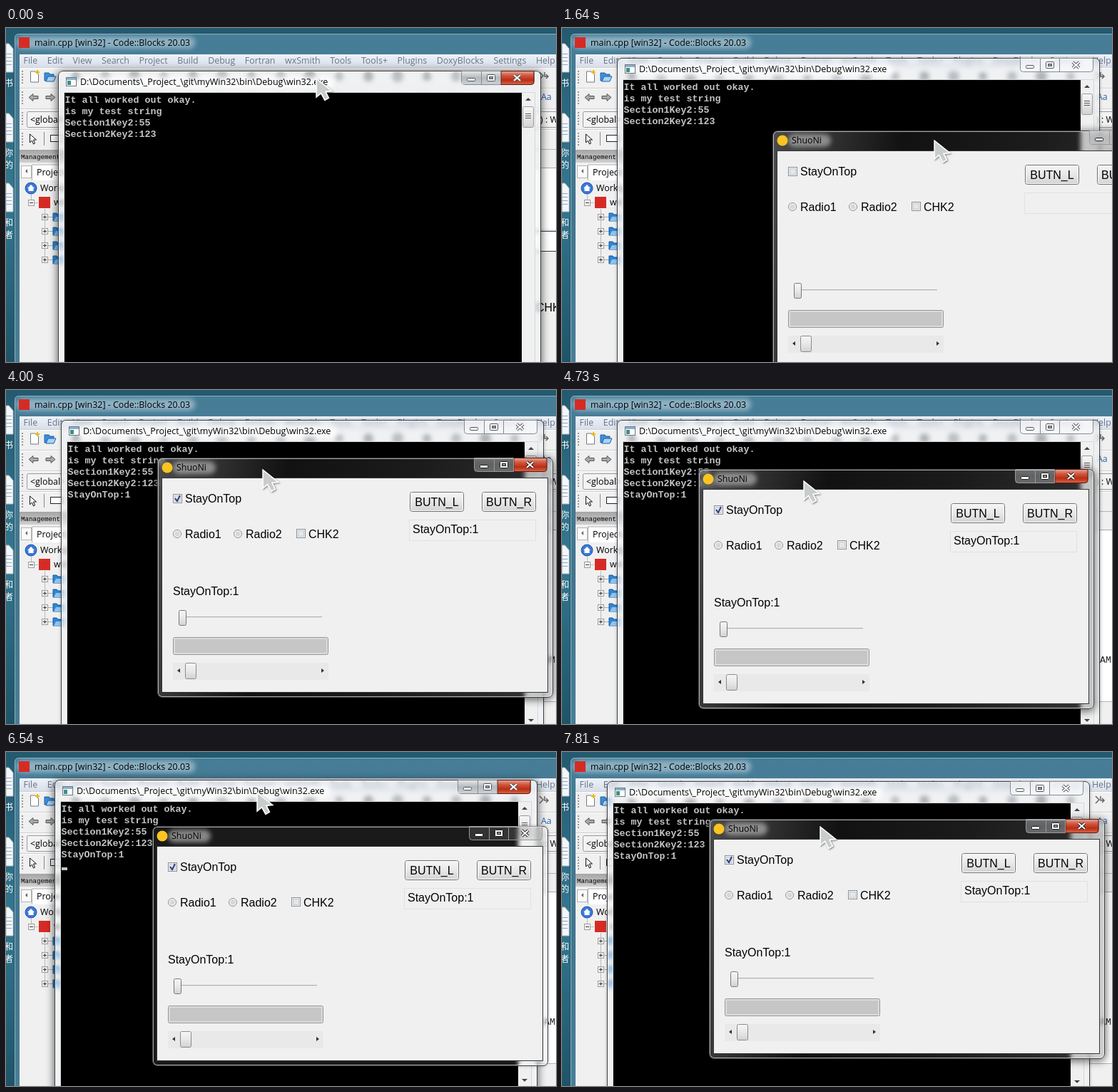
An HTML page that plays this animation: 771x469 px, repeating every 7990 ms.

```html
<!DOCTYPE html>
<html lang="en">
<head>
<meta charset="utf-8">
<title>Stay on top</title>
<style>
html, body { margin: 0; width: 100%; height: 100%; overflow: hidden; }
#stage { position: absolute; inset: 0; overflow: clip; background: #2d6a80; }
svg { position: absolute; left: 0; top: 0; overflow: hidden; }
text { white-space: pre; }
.ui { font: 12.4px "Open Sans", sans-serif; }
.ctl { font: 16px "Liberation Sans", Arial, sans-serif; }
.con { font: bold 13.33px "Liberation Mono", monospace; fill: #c4c4c4; }
.cjk { font: 12px "Noto Sans CJK SC", "Noto Sans CJK", sans-serif; fill: #fff; }
.cap { font: 9.2px "Liberation Mono", monospace; }
.win { position: absolute; left: 0; top: 0; border-radius: 7px; box-sizing: border-box;
  border: 1px solid #3c4043; backdrop-filter: blur(3px);
  box-shadow: inset 0 0 0 1px rgba(255,255,255,.6), 0 0 4px rgba(0,0,0,.3); }
.win.on { box-shadow: inset 0 0 0 1px rgba(255,255,255,.6), 0 2px 12px 1px rgba(0,0,0,.6); }
.win > svg { left: -1px; top: -1px; }
#con { width: 677px; height: 439px; margin-left: -1px; background: rgba(240,242,244,.45); }
#con > svg { left: 0; }
#dlg { width: 555px; height: 337px; z-index: 1; background: rgba(255,255,255,.1); }
#dlg.on { background: linear-gradient(100deg, rgba(150,150,150,.5), rgba(80,80,80,.22) 30%, rgba(90,90,90,.3) 60%, rgba(130,130,130,.4)); }
#cur { z-index: 3; }
.glow { filter: blur(3px); }
.hot { visibility: hidden; }
.on .hot { visibility: visible; }
</style>
</head>
<body>
<div id="stage">
  <svg id="ide" width="771" height="469"></svg>
  <div id="con" class="win"></div>
  <div id="dlg" class="win"></div>
  <svg id="cur" width="32" height="38"></svg>
</div>
<script>
const $ = id => document.getElementById(id);
const R = (x, y, w, h, fill, more = '') => `<rect x="${x}" y="${y}" width="${w}" height="${h}" fill="${fill}" ${more}/>`;
const B = (x, y, w, h, fill, line, r = 0) => R(x + .5, y + .5, w - 1, h - 1, fill, `stroke="${line}" rx="${r}"`);
const T = (x, y, s, cls, more = '') => `<text x="${x}" y="${y}" class="${cls}" ${more}>${s.replace('<g', '&lt;g')}</text>`;
const P = (d, fill, line = 'none', w = 1) => `<path d="${d}" fill="${fill}" stroke="${line}" stroke-width="${w}"/>`;
const C = (x, y, r, fill, line = 'none') => `<circle cx="${x}" cy="${y}" r="${r}" fill="${fill}" stroke="${line}"/>`;
const grad = (id, ...stops) => `<linearGradient id="${id}" x2="0" y2="1">` +
  stops.map((c, i) => `<stop offset="${i / (stops.length - 1)}" stop-color="${c}"/>`).join('') + '</linearGradient>';
const rep = (n, f) => Array.from({ length: n }, (_, i) => f(i)).join('');

function desktop() {
  const doc = y => P(`M0 ${y}h4l6 7v33H0z`, '#f4f6f8', '#a9b9c4') + rep(4, i => R(0, y + 14 + 5 * i, 8, 1, '#8aa8c8'));
  const label = (s, y) => [...s].map((c, i) => T(-2, y + 17 * i, c, 'cjk')).join('');
  return R(0, 0, 771, 469, 'url(#desk)') + rep(3, i => doc(22 + 98 * i)) +
    label('书', 82) + label('你的', 180) + label('和者', 278);
}

function toolbars() {
  let s = rep(4, i => R(19, 55 + 29 * i, 760, 1, '#cfcfcf') + R(19, 56 + 29 * i, 760, 1, '#fff') +
    rep(5, j => R(22, 60 + 29 * i + 4 * j, 2, 2, '#9a9a9a')));
  s += P('M34.500 61h7l4 4v11h-11z', '#fff', '#6c7a8a') + P('M44 59v6M41 62h6', 'none', '#e8b800', 2);
  s += P('M54 63h6l2 2h5v9H54z', '#3d8fd8', '#1f5fa5') + P('M56 75l3-7h11l-3 7z', '#a8d4f5', '#1f5fa5');
  s += P('M32 97.500l6-5v3h7v4h-7v3z', '#a9a9a9', '#555') + P('M69 97.500l-6-5v3h-7v4h7v3z', '#a9a9a9', '#555');
  s += rep(16, i => C(98 + i * 41, 68, 6 + i % 3, i % 2 ? '#8d949b' : '#777d84') + R(90 + i * 41, 92, 10, 10, '#c3c8cd'));
  s += P('M748 62l5 5-5 5M755 62v6h5M757 65l3 3-3 3', 'none', '#666', 1.5) + T(750, 101, 'Aa', 'ui', 'fill="#2a5fae"');
  s += B(29, 117, 330, 23, '#f3f3f3', '#9a9a9a', 2) + T(34, 133, '<global>', 'ui');
  s += B(364, 117, 420, 23, '#f3f3f3', '#9a9a9a', 2) + T(749, 133, ') : WPARAM', 'ui');
  return s + P('M33.500 149v12l3-3 2 5 2-1-2-5h4z', '#fff', '#111') + R(53, 146, 1, 19, '#888') + B(62, 150, 18, 10, '#fff', '#222');
}

function projectTree() {
  const node = (x, y, plus) => B(x - 4, y - 4, 9, 9, '#fff', '#999') + R(x - 2, y, 5, 1, '#333') + (plus ? R(x, y - 2, 1, 5, '#333') : '');
  const folder = y => P(`M59 ${y}.5h7`, 'none', '#aaa') + node(54, y, true) +
    P(`M66 ${y - 5}h5l2 2h8v9H66z`, '#2f86d6', '#155a9c') + P(`M67 ${y + 6}l3-6h12l-2 6z`, '#8fc4ef');
  let s = R(19, 171, 250, 18, 'url(#cap)') + T(21, 184, 'Management', 'cap');
  s += B(21, 193, 15, 18, '#fafafa', '#b5b5b5') + P('M30 198v6l-3-3z', '#666');
  s += P('M36.500 214v-22h70v22', '#fff', '#b0b0b0') + T(43, 207, 'Projects', 'ui');
  s += C(35, 225, 8, '#3a78d8', '#2256a8') + P('M30 225l5-5 5 5h-1.500v4h-7v-4z', '#fff') + T(48, 229, 'Workspace', 'ui');
  s += P('M35.500 234v7M40 245.500h5M54.500 254v72', 'none', '#bbb');
  return s + R(46, 237, 16, 16, '#d62b25') + T(67, 249, 'win32', 'ui', 'font-weight="bold"') +
    node(35, 245) + rep(4, i => folder(265 + 20 * i));
}

function ide() {
  const menu = 'File Edit View Search Project Build Debug Fortran wxSmith Tools Tools+ Plugins DoxyBlocks Settings Help';
  let s = `<defs>${grad('desk', '#245a70', '#347890', '#1f5468')}${grad('bar', '#477d97', '#42768f', '#4a7f98')}
    ${grad('menu', '#eef2f8', '#d8dfea')}${grad('cap', '#a5a5a5', '#cfcfcf')}${grad('face', '#f6f6f6', '#e8e8e8', '#d2d2d2')}
    ${grad('grey', '#e4e6e8', '#b4b9be', '#cdd1d4')}${grad('red', '#e5a596', '#d0563f', '#bb2d14', '#d8674c')}</defs>`;
  s += desktop() + B(11, 7, 800, 500, 'url(#bar)', '#24505f', 6) + B(12, 8, 798, 498, 'none', '#8ab6c9', 5);
  s += R(15, 12, 250, 17, '#c6dbe6', 'rx="8" opacity=".55" class="glow"');
  s += R(18, 13, 15, 15, '#d62b25') + T(40, 25, 'main.cpp [win32] - Code::Blocks 20.03', 'ui');
  s += R(19, 37, 760, 440, '#f0f0f0') + R(19, 37, 760, 18, 'url(#menu)');
  s += T(11, 50, menu.split(' ').map(n => `<tspan dx="13.600">${n}</tspan>`).join(''), 'ui', 'fill="#67758a"');
  s += toolbars() + projectTree();
  // editor pane
  s += R(270, 170, 510, 1, '#b5b5b5') + R(270, 196, 510, 1, '#a8a8a8') + R(270, 197, 510, 240, '#fff');
  return s + R(270, 437, 510, 1, '#b5b5b5') + T(754, 383, 'AM', 'con', 'style="font-weight:400;fill:#222"');
}

// minimise, maximise and close buttons
function caps(x, dark) {
  const rim = dark ? '#1c1c1c' : '#4d5358', edge = dark ? '#999' : '#858b90';
  const cross = (c, w) => P(`M${x + 74} 6l9 8m0 -8l-9 8`, 'none', c, w);
  return P(`M${x}.5 .5v15q0 4 4 4h94q4 0 4 -4v-15z`, dark ? 'rgba(150,150,150,.2)' : 'rgba(255,255,255,.5)', edge) +
    `<g class="hot">${R(x + 1, 1, 55, 18, 'url(#grey)', `opacity="${dark ? .3 : 1}"`)}` +
    P(`M${x + 56} .5h46v15q0 4 -4 4h-42z`, 'url(#red)', '#5c1a10') + '</g>' +
    P(`M${x + 28}.5 1v18M${x + 55}.5 1v18`, 'none', edge) +
    B(x + 8, 10, 12, 5, '#fff', rim, 1) + B(x + 36, 5, 12, 10, '#fff', rim, 1) + B(x + 39, 8, 6, 4, '#999', rim) +
    cross(rim, 4) + cross('#fff', 2.2);
}

function consoleWin() {
  const lines = ['It all worked out okay.', 'is my test string', 'Section1Key2:55', 'Section2Key2:123'];
  let s = R(26, 9, 360, 16, '#fff', 'rx="8" opacity=".8" class="glow"');
  s += B(10, 9, 15, 13, '#fff', '#6b7780') + R(11, 10, 13, 3, '#8fb0c8') + R(12, 14, 5, 6, '#3e8f8a');
  s += T(30, 20, 'D:\\Documents\\_Project_\\git\\myWin32\\bin\\Debug\\win32.exe', 'ui', 'style="font-size:12.5px"');
  s += caps(564) + B(7, 30, 661, 402, '#000', '#d4d7da');
  s += R(649, 31, 18, 400, '#f0f0f0') + P('M654 42l4-4 4 4z', '#444') + P('M654 420l4 4 4-4z', '#444');
  s += B(650, 50, 16, 30, 'url(#face)', '#999', 2) + rep(3, i => R(654, 60 + 3 * i, 8, 1, '#555'));
  s += lines.map((l, i) => T(8.500, 45 + 16 * i, l, 'con')).join('');
  return s + T(8.500, 109, 'StayOnTop:1', 'con', 'id="log"') + R(9, 123, 8, 4, '#c4c4c4', 'id="caret"');
}

function dialogWin() {
  const check = (x, y) => B(x, y, 13, 13, '#f6f6f6', '#8a8f94') + B(x + 2, y + 2, 9, 9, '#e4e7ea', '#c3c8cc');
  const radio = x => C(x, 107, 5.5, '#f4f4f4', '#8a8f94') + C(x, 107, 3.5, '#d5d8da');
  const button = (x, t) => B(x, 48, 76, 28, 'url(#face)', '#707070', 3) + B(x + 1, 49, 74, 26, 'none', '#fbfbfb', 2) +
    T(x + 38, 68, t, 'ctl', 'text-anchor="middle"');
  let s = R(22, 5, 60, 18, '#aaa', 'rx="9" opacity=".75" class="glow"');
  s += C(14, 14, 7.5, '#fbc421') + T(27, 18, 'ShuoNi', 'ui') + caps(444, true);
  s += B(6, 28, 542, 302, '#f0f0f0', '#33373a');
  s += check(22, 51) + T(39, 63, 'StayOnTop', 'ctl') + `<g id="tick">${P('M25 57l3 4 4 -8', 'none', '#2b3f85', 2)}</g>`;
  s += button(354, 'BUTN_L') + button(455, 'BUTN_R') + B(353, 87, 178, 30, '#f0f0f0', '#dfe1e4');
  s += radio(28) + T(39, 113, 'Radio1', 'ctl') + radio(113) + T(124, 113, 'Radio2', 'ctl');
  s += check(195, 100) + T(212, 113, 'CHK2', 'ctl');
  s += `<g id="echo">${T(358, 106, 'StayOnTop:1', 'ctl')}${T(22, 193, 'StayOnTop:1', 'ctl')}</g>`;
  s += R(30, 223, 201, 1, '#b0b0b0') + R(30, 224, 201, 1, '#e4e4e4') + B(30, 214, 11, 22, 'url(#face)', '#777', 2);
  s += B(22, 252, 218, 25, '#dcdcdc', '#969696', 2) + R(25, 255, 212, 19, '#c6c6c6');
  s += R(22, 288, 218, 24, '#e9e9e9') + P('M32 296v6l-4-3zM230 296v6l4-3z', '#333');
  return s + B(39, 288, 16, 23, 'url(#face)', '#8b8b8b', 2);
}

$('ide').innerHTML = ide();
$('con').innerHTML = `<svg width="675" height="439">${consoleWin()}</svg>`;
$('dlg').innerHTML = `<svg width="555" height="337">${dialogWin()}</svg>`;
$('cur').innerHTML = `<g transform="scale(1.080)" style="filter:drop-shadow(1px 1px 1px rgba(0,0,0,.45))">` +
  P('M1 1v24l6-5 5 9 5-3-4-8 8-1z', '#c9cccc', '#fff', 1.5) + '</g>';

const key = (t, x, y) => ({ t, x, y });
function ease(keys, t) {
  const a = keys.findLast(k => k.t <= t) || keys[0], b = keys.find(k => k.t > t) || a;
  const s = a === b ? 0 : (t - a.t) / (b.t - a.t), e = s * s * (3 - 2 * s);
  return { x: a.x + (b.x - a.x) * e, y: a.y + (b.y - a.y) * e };
}

// where the windows are dragged; time counts captures
const paths = {
  con: [key(0, 74, 60), key(2, 74, 40), key(4, 78, 42), key(30, 78, 42), key(31, 73, 42), key(33, 29, 43),
    key(36, 69, 39), key(37, 66, 28), key(40, 64, 41)],
  dlg: [key(7, 531, 285), key(10, 212, 95), key(23, 212, 95), key(24, 203, 86), key(26, 191, 111), key(29, 205, 104),
    key(42, 205, 104), key(43, 206, 94)]
};
// pointer stays: on a window (offset from its corner) or at a place
const stay = (from, to, win, x, y) => ({ from, to, win, x, y });
const stays = [stay(0, 5, 'con', 360, 10), stay(6, 6, '', 800, 300), stay(7, 11, 'dlg', 226, 13), stay(14, 15, '', 240, 152),
  stay(17, 17, '', 358, 84), stay(18, 20, 'con', 282, 18), stay(22, 29, 'dlg', 147, 16), stay(30, 40, 'con', 282, 17),
  stay(42, 43, 'dlg', 155, 10)];

function pointer(t) {
  const spot = (s, n) => {
    const o = s.win ? ease(paths[s.win], n) : { x: 0, y: 0 };
    return key(n, o.x + s.x, o.y + s.y);
  };
  const i = stays.findLastIndex(s => s.from <= t), s = stays[i];
  return t <= s.to ? spot(s, t) : ease([spot(s, s.to), spot(stays[i + 1], stays[i + 1].from)], t);
}

const place = (id, p) => $(id).style.transform = `translate(${Math.round(p.x)}px,${Math.round(p.y)}px)`;
const show = (id, on) => $(id).style.visibility = on ? 'visible' : 'hidden';

const loop = 7990, step = 181.7, count = 44;
function draw(now) {
  const t = Math.min(count - 1, Math.floor((now % loop + 8) / step));
  const focus = stays.findLast(s => s.win && s.from <= t).win;
  for (const id in paths) {
    place(id, ease(paths[id], t));
    $(id).classList.toggle('on', id === focus);
  }
  place('cur', pointer(t));
  $('con').style.zIndex = t < 7 ? 2 : 0;
  ['log', 'tick', 'echo'].forEach(id => show(id, t >= 15));
  show('caret', t >= 35 && t <= 37);
  requestAnimationFrame(draw);
}
draw(performance.now());
</script>
</body>
</html>
```
